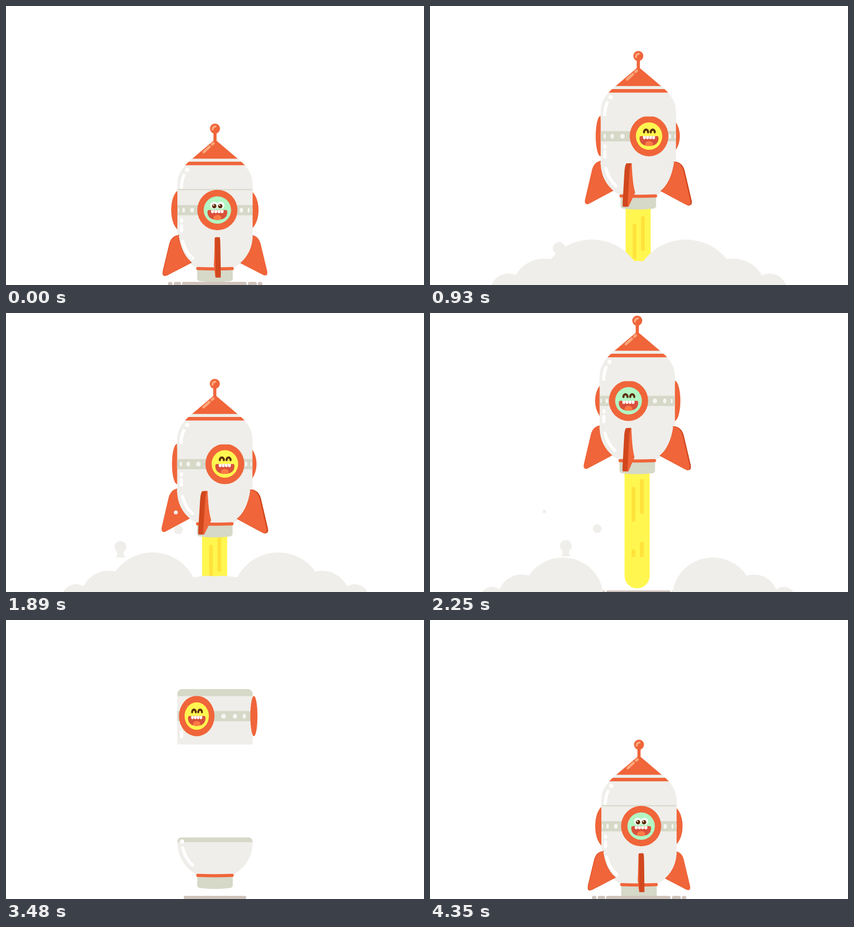
An HTML page with a canvas for the animation above (4380 ms loop, 800x534 px).

```html
<!DOCTYPE html>
<html lang="en">
<head>
<meta charset="utf-8">
<title>Rocket</title>
<style>
  html, body { margin: 0; width: 100%; height: 100%; overflow: hidden; background: #fff; }
  canvas { display: block; width: 800px; height: 534px; }
</style>
</head>
<body>
<canvas id="stage" width="800" height="534"></canvas>
<script>
const ctx = document.getElementById('stage').getContext('2d');
const LOOP = 4380, STEP = 30, DEG = Math.PI / 180;
const LAUNCH = 310, HOVER = 690, LEAVE = 1470, GONE = 2700, RETURN = 3090, FINS_OUT = 4050;
const ORANGE = '#f0653a', DARK = '#d1481f', LIGHT = '#fba77c', BODY = '#efeeea',
      GREY = '#d6d8c8', GROUND = '#cfc3bc', YELLOW = '#fff650', AMBER = '#ffe23a',
      BROWN = '#5e2f0d';
const GLASS = ['#b2f6c3', YELLOW, '#b1aae8'];
const PUFF_X = [247, 251, 480, 325, 330, 219, 320, 260];
const SPIN = [[0, 3.5], [930, 256], [1470, 483], [2250, 707], [3480, 932], [LOOP, 1083.5]];

const clamp = u => Math.max(0, Math.min(1, u));
const easeOut = (u, power = 2) => 1 - (1 - clamp(u)) ** power;

// Three turns per loop, smooth through a few key angles
function spinAt(t) {
  let i = 0;
  while (SPIN[i + 1][0] < t) i++;
  const slope = k => (SPIN[k + 1][1] - SPIN[k][1]) / (SPIN[k + 1][0] - SPIN[k][0]);
  const tangent = k => k === 0 || k === SPIN.length - 1 ? 0 : (slope(k - 1) + slope(k)) / 2;
  const [t0, a] = SPIN[i], [t1, b] = SPIN[i + 1];
  const h = t1 - t0, u = (t - t0) / h, w = 1 - u;
  return a * (1 + 2 * u) * w * w + b * u * u * (3 - 2 * u)
       + h * u * w * (tangent(i) * w - tangent(i + 1) * u);
}

const wave = t => Math.cos(Math.PI * (t - HOVER) / (LEAVE - HOVER));

function flightY(t) {
  if (t < LAUNCH) return -4 * Math.sin(2 * Math.PI * t / LAUNCH);
  if (t < HOVER) return -153 * easeOut((t - LAUNCH) / (HOVER - LAUNCH));
  if (t < LEAVE) return -120.5 - 32.5 * wave(t);
  return -88 - 132 * ((t - LEAVE) / 780) ** 4;
}

const swayX = t => -3.3 * wave(t) * clamp((t - LAUNCH) / 900);

// A part falls at even speed, then bounces once
function dropY(t, land) {
  if (t < land) return -2.46 * (land - t);
  return -18 * Math.sin(Math.PI * clamp((t - land) / 250));
}

function hopY(t) {
  const w = Math.sin(2 * Math.PI * clamp((t - 4080) / 300) ** 2);
  return w > 0 ? -15 * w : -4.3 * w;
}

function fill(color, d) { ctx.fillStyle = color; ctx.fill(new Path2D(d)); }
function line(color, width, d) {
  ctx.strokeStyle = color;
  ctx.lineWidth = width;
  ctx.lineCap = 'round';
  ctx.stroke(new Path2D(d));
}
function oval(color, x, y, rx, ry = rx) {
  ctx.fillStyle = color;
  ctx.beginPath();
  ctx.ellipse(x, y, rx, ry, 0, 0, 2 * Math.PI);
  ctx.fill();
}
function box(color, x, y, w, h, r = 0) {
  ctx.fillStyle = color;
  ctx.beginPath();
  ctx.roundRect(x, y, w, h, r);
  ctx.fill();
}
function shifted(x, y, draw) {
  ctx.save();
  ctx.translate(x, y);
  draw();
  ctx.restore();
}

function face(awake) {
  if (awake) {
    for (const x of [-6.5, 6.5]) oval('#fff', x, -9, 7);
    for (const x of [-6, 5.5]) {
      oval(BROWN, x, -7.5, 4.3);
      oval('#fff', x - 1.3, -9.2, 1.2);
    }
  } else {
    for (const x of [-6, 7.3]) line(BROWN, 4.2, `M${x - 4},-7.3 C${x - 4},-14 ${x + 4},-14 ${x + 4},-7.3`);
  }
  ctx.save();
  const mouth = 'M-16,0 H16 Q19,0 19,4 C19,14 11,19 0,19 C-11,19 -19,14 -19,4 Q-19,0 -16,0Z';
  fill('#d9503b', mouth);
  ctx.clip(new Path2D(mouth));
  oval('#fb7b46', 0, 15.5, 8, 6);
  ctx.restore();
  for (let i = 0; i < 4; i++) box('#fff', -12 + i * 6.1, 0, 5.5, 6, [0, 0, 2.5, 2.5]);
}

function ports(spin, front, awake) {
  GLASS.forEach((glass, i) => {
    const a = (spin + i * 120) * DEG, c = Math.cos(a);
    if ((c > -0.06) !== front) return;
    shifted(400 + 74.5 * Math.sin(a), 388, () => {
      oval(ORANGE, 0, 0, Math.max(6.8, 38.5 * Math.abs(c)), 38.7);
      if (c < 0.06) return;
      ctx.scale(c, 1);
      oval(glass, 0, 0, 26.3);
      face(awake);
    });
  });
}

const finShape = new Path2D('M69,436 Q85,436 90,453 L104,511 Q105.5,522 96,518.5 L45,492 Q66,476 72,436Z');

function fins(spin, front, grow) {
  if (grow <= 0) return;
  const angles = [0, 90, 180, 270].map(k => (spin + k) * DEG)
    .filter(a => (Math.cos(a) > 0) === front)
    .sort((a, b) => Math.cos(a) - Math.cos(b));
  for (const a of angles) {
    const s = Math.sin(a), c = Math.cos(a), near = -Math.sign(s) * 5 * c;
    const plate = (color, off) => shifted(400 + off, 4 * c, () => {
      ctx.scale(s, 1);
      ctx.translate(45, 436);
      ctx.scale(grow, grow);
      ctx.translate(-45, -436);
      ctx.fillStyle = color;
      ctx.fill(finShape);
    });
    if (front) {
      for (let i = -1; i < 1; i += 0.125) plate(DARK, near * i);
      // outer edge of a fin that points at the viewer
      if (Math.abs(s) < 0.35) {
        const w = 9 * c, y = 436 + 4 * c, x0 = 400 + 72 * s, x1 = 400 + (45 + 56 * grow) * s;
        fill(DARK, `M${x0 - w / 2},${y + 2} Q${x0 - w / 2},${y} ${x0 - w / 2 + 2},${y} H${x0 + w / 2}
          L${x1 + w / 2},${y + 83 * grow} H${x1 - w / 2}Z`);
      }
    }
    plate(ORANGE, near);
  }
}

function base() {
  fill(GREY, 'M366,503 H434 V522 Q434,527 425,527 Q400,530 375,527 Q366,527 366,522Z');
  box(GREY, 328, 430, 144, 12, [8, 8, 0, 0]);
  fill(BODY, 'M328,439 H472 C472,470 455,490 434,502 H366 C345,490 328,470 328,439Z');
  line(ORANGE, 6, 'M367,502.5 Q400,504 433,502.5');
  oval('#fff', 337, 437.5, 4);
  line('#fff', 6, 'M338,450 Q343,470 357,483');
}

function middle(spin, awake) {
  box(GREY, 328, 336.5, 144, 20, [9, 9, 0, 0]);
  box(BODY, 328, 350, 144, 92.5);
  box(GREY, 328, 378.5, 144, 19.5);
  for (let i = 0; i < 9; i++) {
    const a = (spin + Math.floor(i / 3) * 120 + 41 + (i % 3) * 19) * DEG, c = Math.cos(a);
    if (c > 0.05) oval('#f5f5f1', 400 + 72 * Math.sin(a), 388.3, 4.8 * c, 4.6);
  }
  line('#fff', 6, 'M336,407 V409 M336,418 V428');
  ports(spin, true, awake);
}

function nose() {
  fill(BODY, 'M357,291 L344,304 Q328,321 328,340 V350.5 H472 V340 Q472,321 456,304 L443,291Z');
  fill(ORANGE, 'M397.5,257.5 Q400,255 402.5,257.5 L443.5,292.3 H356.5Z');
  fill(ORANGE, 'M350,298 H450 Q454,301 457,304.8 H343 Q346,301 350,298Z');
  box(ORANGE, 397, 240, 6, 20);
  oval(ORANGE, 400, 234.6, 9.6);
  line(LIGHT, 4, 'M395.5,236.5 Q395.5,231 401,230.5');
  line(LIGHT, 5, 'M378.5,279.5 L389.5,269.5 M394.5,265 L397,263');
  oval('#fff', 347, 313.5, 4);
  line('#fff', 6, 'M340.5,324 Q336,334 335.5,347');
}

function flame(t, x, y) {
  const top = 527 + y, length = Math.min(220, 528 - top);
  if (length < 3) return;
  const left = 400 + x - 24.3, r = Math.min(24, length / 2);
  ctx.save();
  box(YELLOW, left, top - 4, 48, length + 4, [0, 0, r, r]);
  ctx.beginPath();
  ctx.rect(left, top, 48, Math.min(160, length));
  ctx.clip();
  const phase = 14 + (t - 930) * 0.361;
  for (const [dx, lag] of [[13.5, 15], [29.5, 0]]) {
    const start = ((phase + lag) % 120 + 120) % 120 - 120;
    for (let k = 0; k < 4; k++) box(AMBER, left + dx, top + start + k * 120, 7, 67, 3.5);
  }
  ctx.restore();
}

function ground(t) {
  const back = t >= RETURN;
  const y = back ? 528 : 528 + Math.max(0, t - 2200) * 0.06;
  const half = back ? clamp((t - 3390) / 240) * 52 + 40 : 92;
  if (y > 534 || (back && t < 3390)) return;
  ctx.save();
  ctx.beginPath();
  ctx.rect(400 - half, 520, 2 * half, 14);
  ctx.clip();
  box(GROUND, 337, y, 123.5, 12, 3.5);
  for (const x of [321, 463]) box(GROUND, x, y, x < 400 ? 14 : 17, 12, 3.5);
  for (const x of [310, 482]) box(GROUND, x, y, 8.5, 12, 3.5);
  ctx.restore();
}

// Bumps well up in the middle, roll outwards and shrink
function cloud(t, x) {
  const cx = 401 + x, flow = t + Math.max(0, t - 1700) * 0.17;
  for (let i = 0; i < 10; i++) {
    const s = (flow - 369) / 187 - i;
    if (s < 0.15 || s > 4.7) continue;
    const d = -23 + 124 * s - 11 * s * s, r = 137.5 - 0.414 * d;
    const y = 546 + 0.012 * Math.max(0, 100 - d) ** 2;
    for (const side of [-1, 1]) oval(BODY, cx + side * d, y, r);
  }
  const rise = Math.min(1, (t - 500) / 200, (1880 - t) / 160);
  if (rise > 0) oval(BODY, cx, 613 - 50 * rise, 75);
  PUFF_X.forEach((px, i) => {
    const p = (t - 870 - 175 * i) / 600;
    if (p < 0 || p > 1) return;
    const y = 475 - 113 * p;
    oval(BODY, px, y, 12 * (1 - p * p));
    if (p < 0.3) fill(BODY, `M${px - 9},${y + 5} Q${px - 3},${y + 13} ${px - 9},${y + 20} H${px + 9} Q${px + 3},${y + 13} ${px + 9},${y + 5}Z`);
  });
}

function draw(t) {
  ctx.fillStyle = '#fff';
  ctx.fillRect(0, 0, 800, 534);
  if (t >= GONE && t < RETURN) return;

  const flying = t < GONE, spin = spinAt(t), awake = t < 330 || t > 4100;
  const x = flying ? swayX(t) : 0, y = flying ? flightY(t) : hopY(t);
  const grow = easeOut(((flying ? t + LOOP : t) - FINS_OUT) / 480, 2.3);
  const [baseY, midY, topY] = [3300, 3564, 3850].map(land => flying ? 0 : dropY(t, land));
  // the middle sits a little lower while standing
  const sag = flying ? 2.5 * (1 - clamp((t - LAUNCH) / 200)) : 2.5;

  if (flying && t > LAUNCH) flame(t, x, y);
  shifted(x, y, () => {
    shifted(0, sag, () => fins(spin, false, grow));
    shifted(0, midY + sag, () => ports(spin, false, awake));
    shifted(0, baseY, base);
    shifted(0, midY + sag, () => middle(spin, awake));
    shifted(0, topY, nose);
    shifted(0, sag, () => fins(spin, true, grow));
  });
  ground(t);
  if (flying) cloud(t, x);
}

const begin = performance.now();
function tick() {
  const t = (performance.now() - begin) % LOOP;
  draw(Math.floor(t / STEP) * STEP);
  requestAnimationFrame(tick);
}
tick();
</script>
</body>
</html>
```
